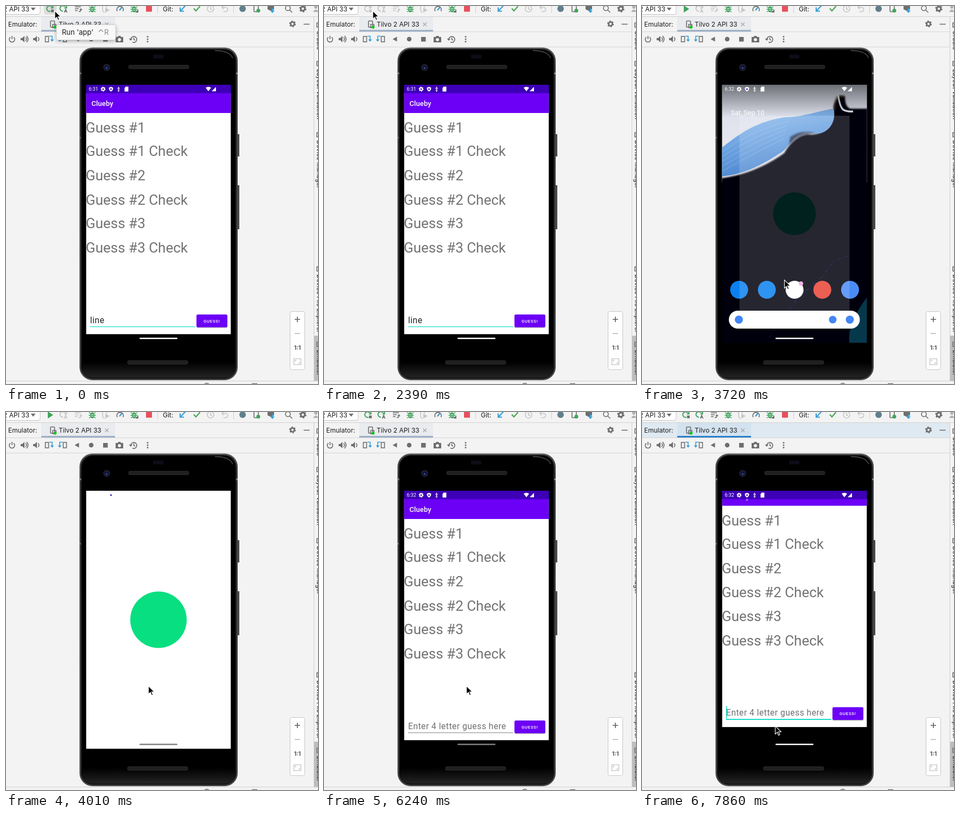
Recreate the animation shown at these times as an HTML page. Size 575 px wide and 696 px high, loop 8000 ms.

```html
<!DOCTYPE html>
<html lang="en">
<head>
<meta charset="utf-8">
<title>Emulator run</title>
<style>
  html, body { margin: 0; width: 100%; height: 100%; overflow: hidden; background: #f3f3f3; }
  svg { display: block; width: 100%; height: 100%; }
  text { white-space: pre; }
  .ui { font: 12px Inter, sans-serif; fill: #1c1c1c; }
  .app { font-family: Roboto, sans-serif; }
  .line { fill: none; stroke: #6e6e6e; stroke-width: 1.6; }
  .ico { fill: #6e6e6e; }
  .green { fill: #3fa45b; }
  .greenLine { fill: none; stroke: #3fa45b; stroke-width: 2; }
  .off .green, .off .ico { fill: #c6c6c6; }
  .off .greenLine, .off .line { stroke: #c6c6c6; }
</style>
</head>
<body>
<svg viewBox="0 0 575 696" preserveAspectRatio="none">
  <defs>
    <clipPath id="screen"><rect x="147.5" y="145" width="267" height="475"/></clipPath>
    <clipPath id="window"><rect x="147.5" y="160" width="267" height="444.5"/></clipPath>
    <linearGradient id="sky" x2="0" y2="1"><stop stop-color="#d9deeb"/><stop offset="1" stop-color="#eceaf0"/></linearGradient>
    <linearGradient id="wave" x2=".35" y2="1"><stop stop-color="#9dc4ee"/><stop offset=".5" stop-color="#6fa5e2"/><stop offset="1" stop-color="#4c86d0"/></linearGradient>
    <linearGradient id="scrim" x2="0" y2="1"><stop stop-color="#000" stop-opacity=".5"/><stop offset="1" stop-color="#000" stop-opacity="0"/></linearGradient>
    <linearGradient id="rim" x2="0" y2="1"><stop stop-color="#55585a"/><stop offset=".06" stop-color="#3a3c3e"/><stop offset="1" stop-color="#444648"/></linearGradient>
    <linearGradient id="chin" x2="0" y2="1"><stop stop-color="#000"/><stop offset="1" stop-color="#232323"/></linearGradient>
    <filter id="soft"><feGaussianBlur stdDeviation="1.8"/></filter>
    <filter id="shade" x="-10%" y="-30%" width="120%" height="170%"><feDropShadow dx="0" dy="2" stdDeviation="3" flood-opacity=".3"/></filter>
  </defs>

  <rect width="575" height="696" fill="#f3f3f3"/>

  <!-- main toolbar -->
  <rect x="-10" y="-10" width="73" height="25.500" rx="4" fill="#fff" stroke="#c4c4c4"/>
  <text class="ui" x="-5" y="9.500">2 API 33</text>
  <path d="M45.500 3h9l-4.500 5.500z" fill="#6e6e6e"/>
  <rect id="hover" x="70" y="-8" width="23" height="23.500" rx="4" fill="#dcdcdc"/>
  <g id="run">
    <g id="rerun">
      <path class="greenLine" d="M82 9.500A5 5 0 1 1 84 1.500"/><path class="green" d="M82 4.500h5.500v-6z"/>
      <rect class="ico" x="83" y="6.500" width="5" height="5"/>
    </g>
    <path id="play" d="M77 -1v13l10-6.500z" class="green"/>
  </g>
  <g id="apply">
    <path class="greenLine" d="M105 9.500A5 5 0 1 1 108.500 1.500"/><path class="green" d="M107 4.500h5.500v-6z"/>
    <path class="line" d="M107.500 12l2.500-6 2.500 6m-4-2h3"/>
    <path class="line" d="M127 1.500h11M127 5h7M127 8.500h5M134 10q4 1 4-3"/><path class="ico" d="M135 7.500h6l-3-3.500z"/>
  </g>
  <g id="bugs"></g>
  <g class="off"><path class="line" d="M178-1h7v4M178-1v9q1 3 4 4"/><path class="ico" d="M183 3v9l8-4.500z"/></g>
  <path class="line" d="M205 9.500A6 6 0 1 1 215.500 9.500" stroke-width="2.400"/><path d="M209 8l5-6" stroke="#389fd6" stroke-width="2.500"/>
  <rect x="258" y="-1" width="11" height="11.500" rx="1" fill="#e8505b"/>
  <path d="M279.500 0v13M419.500 0v13" stroke="#d0d0d0"/>
  <text class="ui" x="289" y="9.500">Git:</text>
  <path d="M331-1l-9 9.500M321 2.500v7h7" fill="none" stroke="#389fd6" stroke-width="2.200"/>
  <path d="M346 4.500l4 4.500 7.500-8.500" fill="none" stroke="#4fa95f" stroke-width="2.400"/>
  <g class="off"><circle class="line" cx="377" cy="5" r="6"/><path class="line" d="M377 1v4.500l3 1.500M401-1l-3 3.500 3 3.500M398.500 2.500h6q5 1 4 5-1 3-5 3h-3"/></g>
  <circle cx="436" cy="5" r="6" fill="#5f7f8c"/>
  <rect class="line" x="457" y="-3" width="8" height="13.500" rx="1"/><circle class="green" cx="465" cy="8.500" r="3.500"/>
  <path class="ico" d="M482 0l6-3 6 3v6l-6 3-6-3z"/><path d="M491 4v7m-3-3l3 3.500 3-3.500" fill="none" stroke="#389fd6" stroke-width="2"/>
  <circle class="line" cx="519.500" cy="4" r="4.500"/><path class="line" d="M523 7.500l4.500 4.500" stroke-width="2"/>
  <g id="gearTop"></g>
  <circle cx="571" cy="2" r="3" fill="#b0b0b0"/><path d="M566 11q5-9 10 0z" fill="#b0b0b0"/>
  <path d="M0 19.500h575" stroke="#d1d1d1"/>

  <!-- tool window header -->
  <rect id="header" y="20" width="567" height="27" fill="#f3f3f3"/>
  <rect id="tab" x="65" y="20" width="136" height="27" fill="#e9ebee"/>
  <rect id="underline" x="65" y="44" width="136" height="3" fill="#9fb1c9"/>
  <text class="ui" x="4" y="38">Emulator:</text>
  <rect class="line" x="82" y="27.500" width="7.500" height="11.500" rx="1" stroke-width="1.200"/><path class="line" d="M86 34h6v6h-6z" stroke-width="1.200"/><circle cx="90.500" cy="39" r="2.700" fill="#17c61f"/>
  <text class="ui" x="97" y="38">Tilvo 2 API 33</text>
  <path d="M182.500 30.500l6.500 6.500m0-6.500l-6.500 6.500" stroke="#a4a4a4" stroke-width="1.100"/>
  <g id="gearHead"></g><path class="line" d="M548.500 33.500h11"/>
  <path d="M0 47.500h567M0 75.500h567" stroke="#d6d6d6"/>

  <!-- emulator controls -->
  <path class="line" d="M8 57.500a5 5 0 1 0 6 0M11 55v6"/>
  <path class="ico" d="M27 59h3l4-4v12l-4-4h-3zM50 59h3l4-4v12l-4-4h-3z"/><path class="line" d="M36 57.500q3.500 3.500 0 7M38 55q5.500 6 0 12M59 57.500q3.500 3.500 0 7" stroke-width="1.300"/>
  <g id="turn"><rect class="line" x="72.500" y="56" width="6" height="10"/><path d="M80 55.500h5v9m-2.500-3l2.500 3 2.500-3" fill="none" stroke="#389fd6" stroke-width="1.600"/></g>
  <use href="#turn" transform="translate(184 0) scale(-1 1)"/>
  <path class="ico" d="M126.500 61l8-4.500v9zM179 57h8.500v8.500h-8.500z"/><circle class="ico" cx="157" cy="61" r="4.300"/>
  <path class="ico" fill-rule="evenodd" d="M202 57h4l1-2h4l1 2h4v10h-14zM209 59a3 3 0 1 0 .1 0z"/>
  <path class="line" d="M230 62a5.500 5.500 0 1 1 3 4.500M235.500 58v3.500l2.500 1.500"/><path class="ico" d="M226.500 60h6.500l-3 4z"/>
  <g class="ico"><circle cx="261" cy="56.500" r="1.500"/><circle cx="261" cy="61" r="1.500"/><circle cx="261" cy="65.500" r="1.500"/></g>

  <!-- right stripe and footer -->
  <path d="M567.500 20v670" stroke="#cfcfcf"/>
  <rect x="568" y="607" width="7" height="83" fill="#bdbdbd"/>
  <g id="stripe"></g>
  <path d="M0 690.500h575" stroke="#cfcfcf"/>
  <path d="M366 696q4-3 8 0M453 695.500h10" stroke="#6e6e6e" stroke-width="1.500" fill="none"/>

  <!-- zoom box -->
  <rect x="523.500" y="562.500" width="27" height="107" rx="3" fill="#fff" stroke="#c6c6c6"/>
  <path d="M532 577h10m-5-5v10" stroke="#5e5e5e" stroke-width="1.600"/><path d="M532 603h10" stroke="#b9b9b9" stroke-width="1.600"/>
  <text class="ui" x="537" y="633" text-anchor="middle" style="font-size:10.500px;font-weight:700;fill:#555">1:1</text>
  <path d="M530.500 649.500h13v11h-13zM533 654.500v-2.500h2.500M541 655.500v2.500h-2.500" fill="none" stroke="#bdbdbd" stroke-width="1.200"/>

  <!-- phone -->
  <path d="M427 236h3v41h-3zM427 330h3v81h-3z" fill="#4a4a4a"/>
  <rect x="135.500" y="76.500" width="291.500" height="612.500" rx="24" fill="url(#rim)"/>
  <rect x="138" y="79" width="286.500" height="607.500" rx="22" fill="#151515"/>
  <rect x="140" y="81" width="282.500" height="603" rx="20"/>
  <path d="M141 655h281v12q0 17-19 17h-243q-19 0-19-17z" fill="url(#chin)"/>
  <path d="M135.500 124h3M424 124h3M135.500 242.500h2" stroke="#8a8a8a" stroke-width="3"/>
  <path d="M385 82q28 0 33 14" fill="none" stroke="#777" stroke-width="1"/>
  <rect x="271" y="89.500" width="19" height="7" rx="1" fill="#0d0d18"/>
  <circle cx="185.500" cy="113" r="6.300" fill="#20222c"/><circle cx="185.500" cy="113" r="4" fill="#0d1338"/><circle cx="185.500" cy="114" r="1.500" fill="#3a56b4"/>
  <g fill="#1f1f20" stroke="#333" stroke-width=".8"><rect x="226" y="109" width="111" height="6.500" rx="2.500"/><rect x="224" y="653" width="111" height="6.500" rx="2.500"/></g>

  <g clip-path="url(#screen)">
    <rect x="147" y="145" width="268" height="475"/>
    <g id="wallpaper">
      <rect x="147" y="145" width="268" height="180" fill="url(#sky)"/>
      <path d="M140 318C190 312 230 294 262 271 275 248 290 238 305 236 325 240 353 225 353 200L353 184Q358 168 364 165L374 166Q374 186 384 189H425V640H140Z" fill="#04040f" filter="url(#soft)"/>
      <path d="M355 190q1-22 8-24l10 1" fill="none" stroke="#6b4c2c" stroke-width="4" opacity=".5" filter="url(#soft)"/>
      <path d="M147 261C180 235 210 213 262 205 300 204 325 193 353 189 358 212 346 232 325 235 312 236 306 230 296 234 278 239 272 258 258 269 230 287 195 309 147 314Z" fill="url(#wave)"/>
      <path d="M273 241q20-14 46-7l-20 3q-18 6-28 20z" fill="#14203c" opacity=".75" filter="url(#soft)"/>
      <path id="ripples" fill="none" stroke="#b5d2f2" stroke-width="1" opacity=".4"/>
      <path d="M360 146q2 38 11 45 7 4 18 3" fill="none" stroke="#dfe3ec" stroke-width="3.500"/>
      <path d="M415 536Q378 584 382 620H415Z" fill="#06384c"/>
      <path d="M235 612l10-20 18-22 16-22 30-30 24-20 20-28 26-10" fill="none" stroke="#17175c" stroke-width="1.500" stroke-dasharray="7 3 2 4" opacity=".6"/>
    </g>
    <g id="home">
      <rect x="147" y="145" width="268" height="60" fill="url(#scrim)"/>
      <text class="app" x="163.500" y="200.500" font-size="12.500" fill="#fff">Sat, Sep 10</text>
      <g id="dock"></g>
      <circle cx="293" cy="511" r="4" fill="#f4a6e4"/>
      <rect x="160" y="561" width="241.500" height="33" rx="16.500" fill="#fff"/>
      <g fill="#4285f4"><circle cx="178.500" cy="577.500" r="7.500"/><circle cx="351.500" cy="577.500" r="7"/><circle cx="383" cy="577.500" r="7.500"/></g>
    </g>
    <g id="app">
      <g clip-path="url(#window)">
        <rect x="147" y="160" width="268" height="445"/>
        <g id="pan">
          <rect x="147" y="160" width="268" height="444.500" fill="#fff"/>
          <rect x="147" y="150" width="268" height="47" fill="#6c00f6"/>
          <text class="app" x="157.500" y="184" font-size="13" font-weight="500" letter-spacing=".1" fill="#fff">Clueby</text>
          <g id="labels" class="app" font-size="26" fill="#737373"></g>
          <text id="field" class="app" x="155" y="583.500" font-size="15.650" letter-spacing=".489"></text>
          <rect id="rule" x="155" width="193.500"/>
          <rect id="caret" y="565.500" width="1.400" height="23.500" fill="#03dac5"/>
          <rect x="351" y="569" width="57" height="24" rx="2.500" fill="#000" opacity=".25"/>
          <rect x="351" y="568" width="57" height="23.500" rx="2.500" fill="#6c00f6"/>
          <text class="app" x="364" y="582.600" font-size="7.800" font-weight="500" letter-spacing=".7" fill="#fff">GUESS!</text>
        </g>
      </g>
      <rect x="147" y="145" width="268" height="15.500" fill="#3d00b6"/>
    </g>
    <g id="splash"><rect x="147.500" y="145" width="267" height="475" fill="#fff"/><circle cx="281" cy="382.500" r="52" fill="#08df80"/></g>
    <g id="status" fill="#fff">
      <text id="clock" class="app" x="152.500" y="156.300" font-size="9"></text>
      <g id="gearPhone"></g>
      <path d="M189.500 150.500l4-1.700 4 1.700q0 5-4 7-4-2-4-7z"/><circle cx="193.500" cy="153" r="1.500" fill="#3d00b6"/>
      <path d="M205.500 152l2-2.500 2 2.500-2 2zM205.500 155l2 2.500 2-2.500M207.500 148.500v9" fill="none" stroke="#fff" stroke-width=".9"/>
      <path d="M218.500 151l2-2.500h5v9h-7z"/>
      <path d="M368 150.500q5-3.500 10 0l-5 6.500zM387 149v8h-8z"/>
    </g>
    <rect id="pill" x="246" y="610.800" width="70" height="2.400" rx="1.200"/>
  </g>

  <g id="tip">
    <rect x="93" y="34.500" width="109" height="28" rx="3" fill="#f8f8f8" stroke="#cfcfcf" filter="url(#shade)"/>
    <text class="ui" x="103" y="53" style="font-size:13px">Run 'app'</text>
    <path d="M171 47.500l4-4 4 4" fill="none" stroke="#858585" stroke-width="1.200"/>
    <text class="ui" x="181" y="53" style="font-size:13px;fill:#858585">R</text>
  </g>
  <path id="pointer" d="M0 0V15L3.600 11.700 6 17.200 8.400 16.200 6 10.800H10.900Z" stroke="#fff" stroke-width="1.100"/>
</svg>
<script>
const LOOP = 8000, TEAL = '#03dac5';
const $ = id => document.getElementById(id);
const set = (id, attrs) => { for (const k in attrs) $(id).setAttribute(k, attrs[k]); };
const show = (id, opacity) => set(id, { opacity: +opacity });

// Value of the last [time, value] pair that has begun.
const held = (t, ...keys) => keys.reduce((v, [from, next]) => t >= from ? next : v, keys[0][1]);
const within = (t, a, b) => t >= a && t < b;

const gear = (x, y, r, color) =>
  `<g fill="none" stroke="${color}"><circle cx="${x}" cy="${y}" r="${r * .58}" stroke-width="${r * .45}"/>
   <circle cx="${x}" cy="${y}" r="${r * .88}" stroke-width="${r * .3}" stroke-dasharray="${r * .46}"/></g>`;
const bug = x =>
  `<ellipse class="green" cx="${x}" cy="6" rx="4" ry="5.500"/>
   <path class="greenLine" style="stroke-width:1.400" d="M${x - 6} 1l3 2m6 0l3-2M${x - 6.5} 6h13M${x - 6} 11l3-2m6 0l3 2"/>
   <path d="M${x - 2.5} 4.500h5m-5 3h5" stroke="#f3f3f3"/>`;
const side = ([y, label]) =>
  `<path class="line" d="M576 ${y}h-3v8h3" stroke-width="1.200"/>
   <text class="ui" style="font-size:11.500px" transform="translate(572.500 ${y + 14}) rotate(90)">${label}</text>`;

$('gearTop').innerHTML = gear(547, 5, 6.5, '#6e6e6e');
$('gearHead').innerHTML = gear(528, 33, 6, '#6e6e6e');
$('gearPhone').innerHTML = gear(179, 153, 4.3, '#fff');
$('bugs').innerHTML = bug(159) + bug(236) + '<path class="ico" d="M238 12h6v-6z"/>';
$('stripe').innerHTML = [[31, 'Gradle'], [102, 'Layout Validation'], [233, 'Device Manager'],
  [480, 'Device File Explorer'], [619, 'Emulator']].map(side).join('');
$('labels').innerHTML = [233, 276, 321, 365.5, 409, 454].map((y, i) =>
  `<text x="147" y="${y}">Guess #${(i >> 1) + 1}${i % 2 ? ' Check' : ''}</text>`).join('');
$('dock').innerHTML = ['#0b80ee', '#0b80ee', '#fff', '#ea4335', '#4a8cf5'].map((c, i) =>
  `<circle cx="${179 + i * 51.1}" cy="522.500" r="16.500" fill="${c}"/>`).join('');
set('ripples', { d: [0, 1, 2, 3, 4].map(i =>
  `M148 ${268 + i * 9}Q${200 + i * 4} ${230 + i * 9} ${270 - i * 2} ${212 + i * 8}`).join('') });

function render(t) {
  // IDE chrome
  const restarting = within(t, 890, 2530), launching = within(t, 3420, 5350);
  const focused = t >= 7120;
  show('hover', t < 890 || within(t, 2530, 3420));
  show('tip', held(t, [0, 1], [440, .45], [590, 0]));
  show('rerun', !launching);
  show('play', launching);
  set('run', { class: restarting ? 'off' : '' });
  set('apply', { class: restarting || launching ? 'off' : '' });
  set('header', { fill: focused ? '#dfe9f1' : '#f3f3f3' });
  set('tab', { fill: focused ? '#d3e2ef' : '#e9ebee' });
  set('underline', { fill: focused ? '#2f80cc' : '#9fb1c9' });

  // phone screen
  const fresh = t >= 3420, typing = !fresh || t >= 7270;
  show('wallpaper', within(t, 2530, 4010));
  show('home', within(t, 2970, 4010));
  show('app', held(t, [0, 1], [2530, .5], [2830, 0], [5500, 1]));
  show('splash', held(t, [0, 0], [3720, .15], [3860, .9], [4010, 1], [5500, .8], [5650, .35], [5790, 0]));
  const scale = held(t, [0, .76], [3860, .93], [4010, 1]);
  set('splash', { transform: `translate(281 382.5) scale(${scale}) translate(-281 -382.5)` });
  set('pan', { transform: `translate(0 ${held(t, [0, 0], [7710, -14], [7860, -24.4])})` });
  $('clock').textContent = fresh ? '6:32' : '6:31';
  show('status', within(t, 2530, 2970) ? .75 : 1);
  set('pill', { fill: within(t, 4010, 6390) ? '#808080' : '#fff' });

  // input field
  $('field').textContent = fresh ? 'Enter 4 letter guess here' : 'line';
  set('field', { fill: fresh ? '#6f6f6f' : '#212121' });
  set('rule', { fill: typing ? TEAL : '#8f8f8f', y: fresh && typing ? 589.5 : 590, height: fresh && typing ? 1.8 : 1.1 });
  set('caret', { x: fresh ? 155 : 182 });
  show('caret', within(t, 590, 890) || within(t, 1490, 2390) || t >= 7410);

  const [x, y] = held(t, [0, [90, 9]], [3420, [168, 190]], [3570, [244, 452]], [3720, [262.5, 504.5]],
    [6540, [261, 516]], [6680, [256, 540]], [6830, [249, 566]], [6980, [245.5, 578]]);
  set('pointer', { transform: `translate(${x} ${y})` });
}

const start = performance.now();
function tick() {
  render((performance.now() - start) % LOOP);
  requestAnimationFrame(tick);
}
render(0);
requestAnimationFrame(tick);
</script>
</body>
</html>
```
